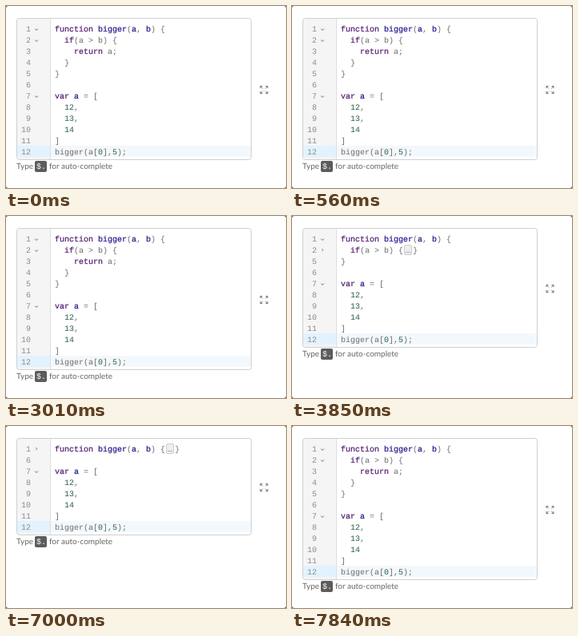
An HTML page that plays this animation: 350 by 228 pixels, repeating every 8 s.

```html
<!DOCTYPE html>
<html lang="en">
<head>
<meta charset="utf-8">
<style>
html, body { margin: 0; width: 100%; height: 100%; overflow: hidden; background: #555; }
svg { display: block; width: 350px; height: 228px; }
text { font: 10px "Liberation Mono", monospace; fill: #6c6c6c; white-space: pre; text-rendering: geometricPrecision; }
.ui { font: 10px Lato, sans-serif; fill: #666; }
.title { font: bold 11px Lato, sans-serif; fill: #555; }
.num { fill: #8c8c8c; text-anchor: end; }
.k, .d { stroke-width: .2; }
.k { fill: #4f1a70; stroke: #4f1a70; }
.d { fill: #22188c; stroke: #22188c; }
.n { fill: #2a5f4c; }
.dots { fill: #666; }
path { fill: none; stroke: #666; stroke-width: .9; }
</style>
</head>
<body>
<svg id="stage" viewBox="0 0 350 228"></svg>
<script>
const LOOP = 8000, ROW = 14, TOP = 21, BOX_TOP = 15, CODE_X = 61, CHAR = 6, BASE = 10.5;

// Markup: k = keyword, d = definition, n = number
const lines = [
  '{k:function} {d:bigger}({d:a}, {d:b}) {',
  '  {k:if}(a > b) {',
  '    {k:return} a;',
  '  }',
  '}',
  '',
  '{k:var} {d:a} = [',
  '  {n:12},',
  '  {n:13},',
  '  {n:14}',
  ']',
  'bigger(a[{n:0}],{n:5});'
];
const foldEnd = { 1: 5, 2: 4, 7: 11 };

// [start time, folded line or 0]
const states = [[0, 0], [2030, 2], [3010, 0], [3850, 2], [4760, 0], [7000, 1], [7840, 0]];

const plain = s => s.replace(/\{[kdn]:(\w+)\}/g, '$1');
const colour = s => s.replace('>', '&gt;').replace(/\{([kdn]):(\w+)\}/g, '<tspan class="$1">$2</tspan>');
const text = (x, y, s, cls = '') => `<text x="${x}" y="${y}" class="${cls}">${s}</text>`;
const rect = (x, y, w, h, fill, more = '') =>
  `<rect x="${x}" y="${y}" width="${w}" height="${h}" fill="${fill}" ${more}/>`;

function codeRow(n, y, folded) {
  const src = lines[n - 1], indent = src.search(/\S|$/);
  let out = text(31, y + BASE, n, 'num') +
    text(CODE_X + indent * CHAR, y + BASE, colour(src.trim()));
  if (foldEnd[n]) {
    out += folded
      ? `<path d="M37.5 ${y + 6}l1.2 1.5l-1.2 1.5"/>`
      : `<path d="M36.3 ${y + 7.5}l1.8 2l1.8-2"/>`;
  }
  if (folded) {
    const x = CODE_X + plain(src).length * CHAR + 1;
    out += rect(x + .5, y + 1.5, 9, 12, '#eee', 'stroke="#ccc" rx="1.5"') +
      text(x + 2, y + BASE, '…', 'dots') + text(x + 11, y + BASE, '}');
  }
  return out;
}

function expandIcon(cx, cy) {
  let out = '';
  for (const sx of [-1, 1]) for (const sy of [-1, 1])
    out += `<path transform="translate(${cx} ${cy}) scale(${sx} ${sy})" d="M1.7 1.7L4.5 4.5M4.5 2V4.5H2"/>`;
  return out;
}

function draw(fold) {
  const shown = lines.map((_, i) => i + 1).filter(n => !fold || n <= fold || n > foldEnd[fold]);
  const last = TOP + (shown.length - 1) * ROW;
  const bottom = last + ROW + 3, h = bottom - BOX_TOP;
  const box = (fill, stroke) =>
    rect(13.5, BOX_TOP + .5, 293, h, fill, `rx="3" stroke="${stroke}"`);
  return rect(0, 0, 350, 228, '#fff', 'rx="3"') +
    box('#fff', 'none') +
    rect(14, BOX_TOP + 1, 41, h - 1, '#f5f5f5') +
    rect(55, BOX_TOP + 1, 1, h - 1, '#ddd') +
    rect(14, last, 41, ROW, '#e2f2ff') +
    rect(56, last, 250, ROW, '#f3f8fd') +
    box('none', '#d0d0d0') +
    shown.map((n, i) => codeRow(n, TOP + i * ROW, n === fold)).join('') +
    expandIcon(322.5, (BOX_TOP + bottom) / 2 + 1.5) +
    text(13, bottom + 12, 'Type', 'ui') +
    rect(36, bottom + 2, 15, 14, '#5c5c5c', 'rx="2"') +
    `<text x="38" y="${bottom + 12}" style="fill:#fff">$.</text>` +
    text(54, bottom + 12, 'for auto-complete', 'ui');
}

const stage = document.getElementById('stage');
let current = -1;
function tick() {
  const t = performance.now() % LOOP;
  const fold = states.filter(s => s[0] <= t).pop()[1];
  if (fold !== current) stage.innerHTML = draw(current = fold);
  requestAnimationFrame(tick);
}
tick();
</script>
</body>
</html>
```
